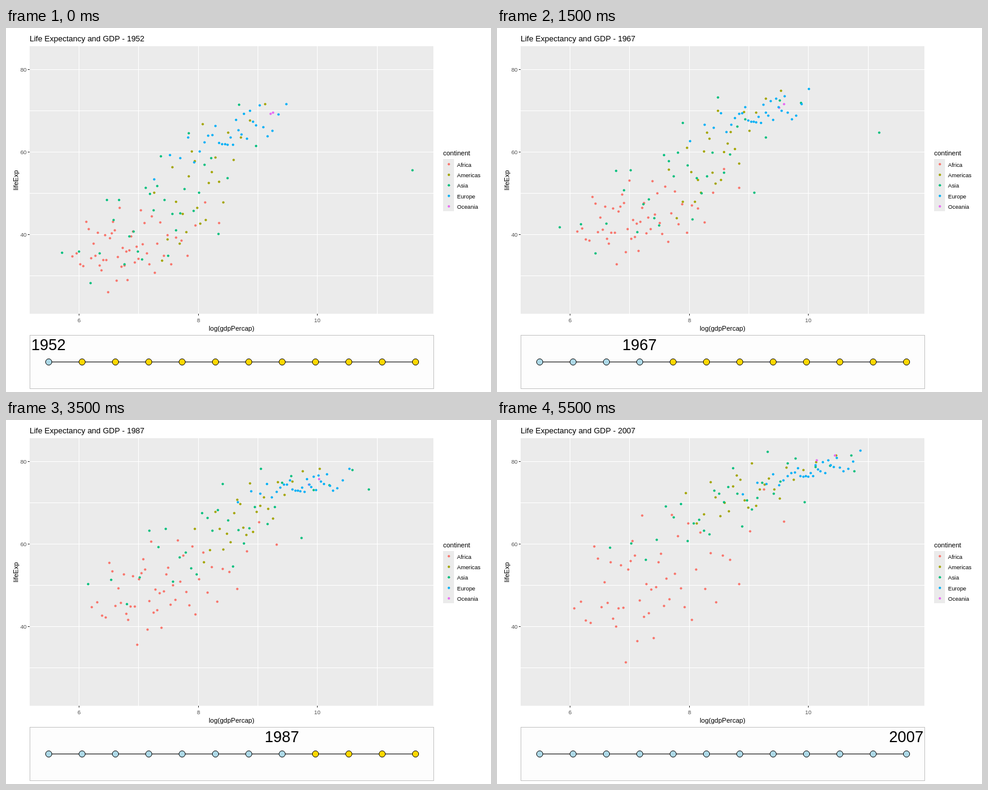
Recreate the animation shown at these times as an HTML page with a canvas. Size 800 by 600 pixels, loop 6000 ms.

```html
<!DOCTYPE html>
<html>
<head>
<meta charset="utf-8">
<title>Life Expectancy and GDP</title>
<style>
  html, body { margin: 0; width: 100%; height: 100%; overflow: hidden; background: #fff; }
  canvas { display: block; }
</style>
</head>
<body>
<canvas id="stage" width="800" height="600"></canvas>
<script>
const ctx = document.getElementById('stage').getContext('2d');
const STEP = 500, MID = 5, LAST = 11;

// Each cloud has a shape on the first, middle and last step:
// centre x, spread x, centre y, slope y (per spread x), scatter y.
const clouds = [
  { name: 'Africa', color: '#F8766D', count: 52, skew: 0.15,
    first: [206, 65, 347, -10, 32], mid: [254, 77, 276, -18, 34], last: [266, 93, 241, -30, 55] },
  { name: 'Americas', color: '#A3A500', count: 25, skew: 0.1,
    first: [325, 53, 250, -42, 45], mid: [386, 56, 175, -38, 27], last: [421, 72, 112, -18, 20] },
  { name: 'Oceania', color: '#E76BF3', count: 2, skew: 0,
    first: [438, 4, 140, -1, 0], mid: [489, 10, 116, -7, 0], last: [542, 25, 62, -6, 0] },
  { name: 'Asia', color: '#00BF7D', count: 32, skew: 0,
    first: [252, 90, 298, -37, 50], mid: [330, 120, 208, -48, 46], last: [385, 112, 132, -42, 30] },
  // The one very rich country, far right of the rest.
  { color: '#00BF7D', count: 1, skew: 0,
    first: [670, 0, 234, 0, 0], mid: [611, 0, 140, 0, 0], last: [589, 0, 84, 0, 0] },
  { name: 'Europe', color: '#00B0F6', count: 30, skew: -0.1,
    first: [366, 62, 175, -34, 18], mid: [460, 53, 124, -14, 11], last: [514, 55, 85, -17, 8] }
];
const legend = clouds.filter(c => c.name).sort((a, b) => a.name < b.name ? -1 : 1);

let seed = 1952;
function random() {
  seed = (seed * 16807) % 2147483647;
  return seed / 2147483647;
}

// Even, bell-shaped spread of wealth; random scatter of life expectancy.
for (const c of clouds) {
  c.points = Array.from({ length: c.count }, (_, i) => {
    const u = 0.03 + 0.94 * (i + 0.5) / c.count;
    const z = 0.58 * Math.log(u / (1 - u));
    return {
      wealth: z + c.skew * (z * z - 1),
      health: 2 * (random() + random() + random()) - 3
    };
  });
}

// Parabola through a at step 0, b at MID and c at LAST.
function curve(a, b, c, s) {
  return a * (s - MID) * (s - LAST) / (MID * LAST)
    + b * s * (s - LAST) / (MID * (MID - LAST))
    + c * s * (s - MID) / (LAST * (LAST - MID));
}

function box(x, y, w, h, color) {
  ctx.fillStyle = color;
  ctx.fillRect(x, y, w, h);
}

function dot(x, y, r, color) {
  ctx.fillStyle = color;
  ctx.beginPath();
  ctx.arc(x, y, r, 0, 7);
  ctx.fill();
}

function text(str, x, y, size, align = 'left', color = '#000') {
  ctx.font = size + 'px "Liberation Sans", Arial, sans-serif';
  ctx.textAlign = align;
  ctx.fillStyle = color;
  ctx.fillText(str, x, y);
}

function drawAxes() {
  box(39, 30, 666, 441, '#EBEBEB');
  for (let i = 0; i < 6; i++) {
    const x = Math.floor(120.6 + 98.3 * i), y = 68 + 68 * i;
    box(x, 30, 1, 441, '#fff');
    box(39, y, 666, 1, '#fff');
    if (i % 2) continue;
    box(x, 471, 1, 3, '#333');
    box(36, y, 3, 1, '#333');
    text(6 + i, x + 0.5, 485, 9.3, 'center', '#4D4D4D');
    text(80 - 10 * i, 34, y + 4, 9.3, 'right', '#4D4D4D');
  }
  text('log(gdpPercap)', 372, 499, 11, 'center');
  ctx.save();
  ctx.translate(20, 251);
  ctx.rotate(-Math.PI / 2);
  text('lifeExp', 0, 0, 11, 'center');
  ctx.restore();
}

function drawCloud(c, step) {
  const [x, spread, y, slope, scatter] =
    c.first.map((v, k) => curve(v, c.mid[k], c.last[k], step));
  const limit = 118 - 6.2 * step;
  for (const p of c.points) {
    const py = y + slope * p.wealth + scatter * p.health;
    // Dots past the longest life expectancy fold back below it.
    const folded = py < limit ? limit + (limit - py) / 2 : py;
    dot(Math.round(x + spread * p.wealth) + 0.5, Math.round(folded) + 0.5, 2, c.color);
  }
}

function drawLegend() {
  text('continent', 721, 210, 11);
  box(721, 216, 18, 86, '#EBEBEB');
  legend.forEach((c, i) => {
    const y = 224.5 + 17.4 * i;
    dot(730.5, y, 2, c.color);
    text(c.name, 744, Math.round(y + 4), 9.3);
  });
}

function drawTimeline(step, year) {
  box(39, 506, 667, 89, '#C4C4C4');
  box(40, 507, 665, 87, '#FDFDFD');
  box(70, 550, 605, 1, '#000');
  ctx.strokeStyle = '#000';
  ctx.lineWidth = 1;
  for (let i = 0; i <= LAST; i++) {
    dot(70.5 + 55 * i, 550.5, 5.2, i <= step ? '#ADD8E6' : '#FFD700');
    ctx.stroke();
  }
  text(year, 70 + 55 * step, 531, 25.5, 'center');
}

function draw(step) {
  const year = 1952 + 5 * step;
  box(0, 0, 800, 600, '#fff');
  text('Life Expectancy and GDP - ' + year, 39, 22, 13);
  drawAxes();
  clouds.forEach(c => drawCloud(c, step));
  drawLegend();
  drawTimeline(step, year);
}

const t0 = performance.now();
function frame() {
  draw(Math.floor((performance.now() - t0) / STEP) % (LAST + 1));
  requestAnimationFrame(frame);
}
frame();
</script>
</body>
</html>
```
